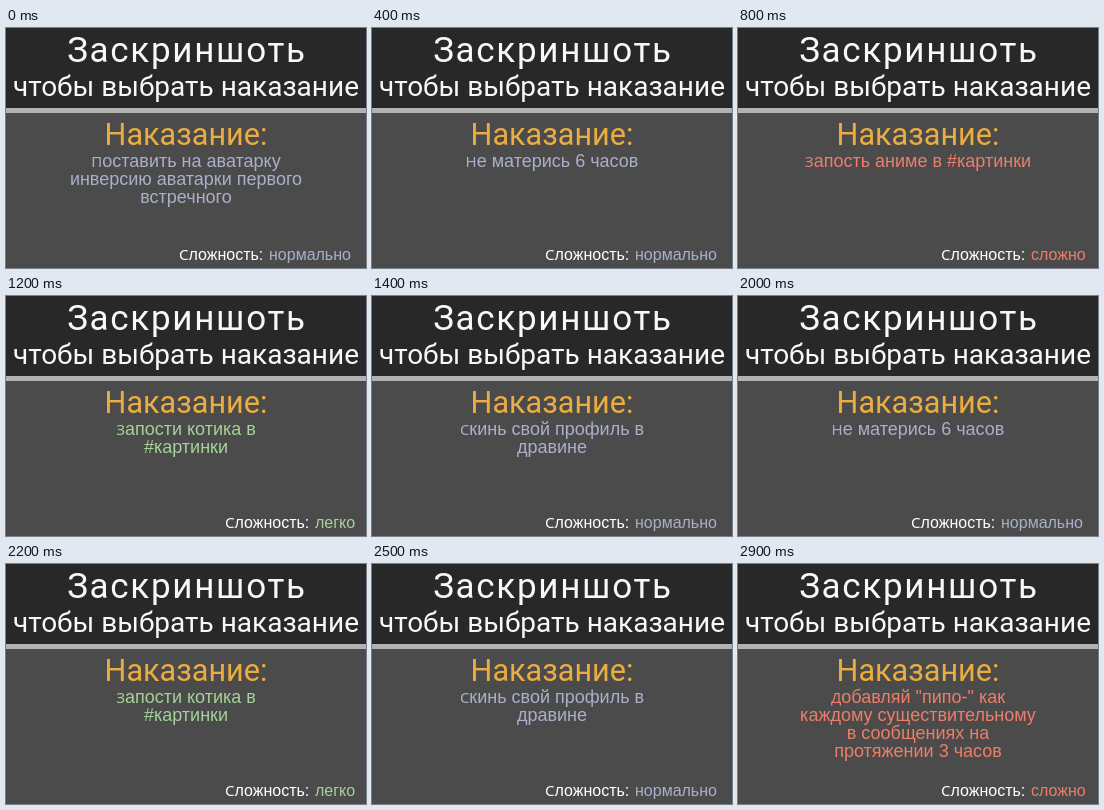
Write an HTML page that moves like this. It is 360 px wide and 240 px high and loops after 3000 ms.

```html
<!DOCTYPE html>
<html lang="ru">
<head>
<meta charset="utf-8">
<title>Заскриншоть</title>
<style>
html, body { margin: 0; width: 100%; height: 100%; overflow: hidden; background: #4b4b4b; }
svg { display: block; width: 360px; height: 240px; }
.head { font-family: Roboto, sans-serif; text-anchor: middle; fill: #f8f8f8; }
#task, #status { position: absolute; font-family: "Liberation Sans", Arial, sans-serif; white-space: pre; }
#task { left: 0; top: 124px; width: 360px; font-size: 18px; line-height: 18px; text-align: center; }
#status { top: 218px; font-size: 16px; line-height: 17px; color: #fff; }
#level { position: absolute; left: 90px; top: 0; }
.initial { font-family: "Noto Sans", "Open Sans", sans-serif; font-size: 15px; line-height: 0; }
</style>
</head>
<body>
<svg viewBox="0 0 360 240">
  <rect width="360" height="240" fill="#4b4b4b"/>
  <rect width="360" height="80" fill="#282828"/>
  <rect y="80" width="360" height="5" fill="#b2b2b2"/>
  <g class="head">
    <text x="180.9" y="34" font-size="35" letter-spacing="1.7">Заскриншоть</text>
    <text x="180" y="68" font-size="28">чтобы выбрать наказание</text>
    <text x="180" y="116.5" font-size="30.6" style="fill:#ebad42">Наказание:</text>
  </g>
</svg>
<div id="task"></div>
<div id="status"><span class="initial">С</span>ложность:<span id="level"></span></div>
<script>
const STEP = 100;
const LEVELS = {
  easy: { text: "легко", color: "#a5d398", x: 219 },
  normal: { text: "нормально", color: "#a9b0c8", x: 173 },
  hard: { text: "сложно", color: "#ee7e69", x: 203 }
};
const CARDS = [
  ["normal", "Поставить на аватарку", "инверсию аватарки первого", "встречного"],
  ["hard", "Запость аниме в #картинки"],
  ["easy", "Запости котика в", "#картинки"],
  ["normal", "Припиши \"пипо\" (\"peepo\")", "к своему нику на 12 часов"],
  ["normal", "Не матерись 6 часов"],
  ["normal", "Скинь свой профиль в", "дравине"],
  ["hard", "Добавляй \"пипо-\" как", "каждому существительному", "в сообщениях на", "протяжении 3 часов"]
];
const ORDER = "032642531453245235264021352046";

const task = document.getElementById("task");
const statusLine = document.getElementById("status");
const level = document.getElementById("level");
let shown = -1;

function show(index) {
  const [key, ...lines] = CARDS[index];
  const { text, color, x } = LEVELS[key];
  const body = lines.join("\n");
  const initial = document.createElement("span");
  initial.className = "initial";
  initial.textContent = body[0];
  task.replaceChildren(initial, body.slice(1));
  task.style.color = level.style.color = color;
  statusLine.style.left = x + "px";
  level.textContent = text;
}

function draw(ms) {
  const index = +ORDER[Math.floor(ms / STEP) % ORDER.length];
  if (index !== shown) show(shown = index);
}

function tick() {
  draw(performance.now() - start);
  requestAnimationFrame(tick);
}

const start = performance.now();
tick();
</script>
</body>
</html>
```
